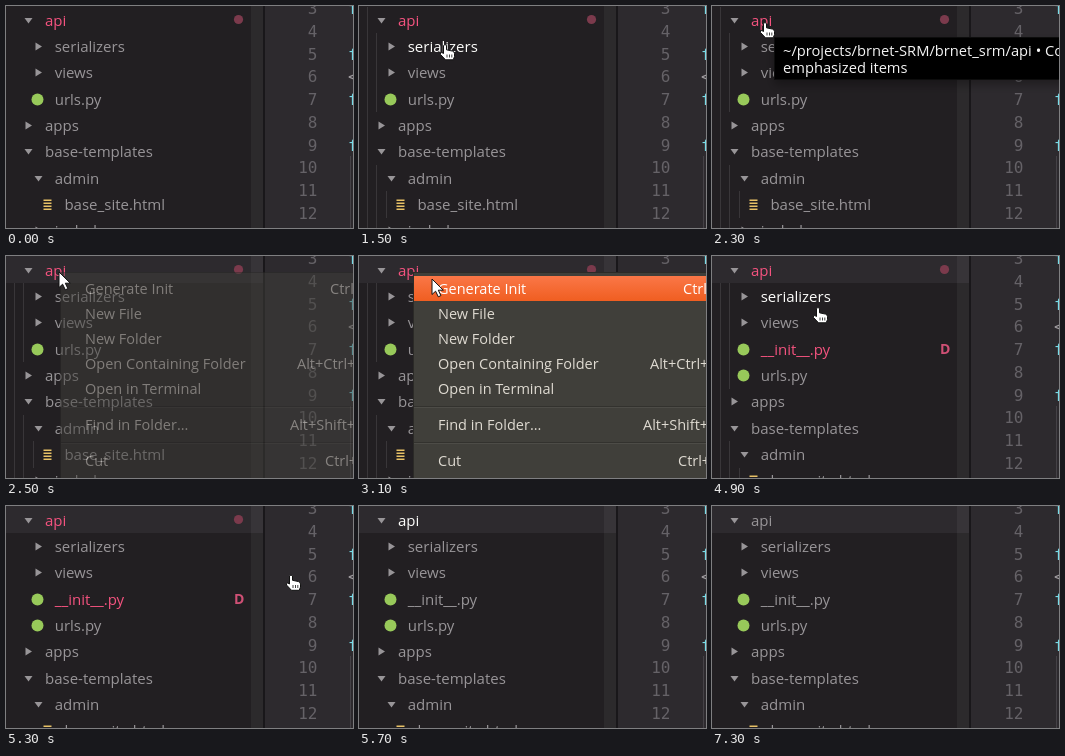
Animation of 347 by 222 pixels, one loop 7500 ms. Source, as an HTML page:

```html
<!DOCTYPE html>
<html lang="en">
<head>
<meta charset="utf-8">
<title>Generate Init</title>
<style>
html, body { margin: 0; height: 100%; overflow: hidden; background: #221f22; }
svg { display: block; width: 347px; height: 222px; }
text { font: 500 15px "Open Sans", "Noto Sans", sans-serif; white-space: pre; }
.line { font: 16px "DejaVu Sans Mono", monospace; text-anchor: end; }
.code { font: 16px "DejaVu Sans Mono", monospace; }
.status { font-weight: 700; font-size: 14px; }
.menu text { font-size: 14.5px; }
.tip text { font-size: 14.7px; }
</style>
</head>
<body>
<svg id="stage" viewBox="0 0 347 222">
  <defs>
    <linearGradient id="orange" x2="0" y2="1">
      <stop stop-color="#fa7747"/><stop offset="1" stop-color="#f05e21"/>
    </linearGradient>
    <filter id="shadow" x="-20%" y="-50%" width="140%" height="220%">
      <feDropShadow dx="0" dy="5" stdDeviation="5" flood-opacity=".3"/>
    </filter>
  </defs>
  <g id="scene"></g>
</svg>
<script>
const LOOP = 7500, STEP = 100, PITCH = 26.33;
const GREY = '#989598', PINK = '#f4537f', WHITE = '#fcfcfa';
const scene = document.getElementById('scene');

// time, x, y of the pointer's tip
const path = [
  [1000, 335, 190], [1200, 195, 108], [1500, 86, 38], [1600, 86, 38],
  [2000, 53, 16], [2800, 53, 16], [3100, 73, 23], [4600, 73, 23],
  [4900, 106, 51], [5200, 235, 87], [5400, 335, 50], [5600, 344, 5], [5700, 360, 0]
];

// name, depth, kind
const tree = [
  ['api', 0, 'open'], ['serializers', 1, 'shut'], ['views', 1, 'shut'],
  ['urls.py', 1, 'py'], ['apps', 0, 'shut'], ['base-templates', 0, 'open'],
  ['admin', 1, 'open'], ['base_site.html', 2, 'html'], ['includes', 1, 'shut']
];

// label, baseline, shortcut, its x
const items = [
  ['Generate Init', 38, 'Ctrl+', 324], ['New File', 63], ['New Folder', 88],
  ['Open Containing Folder', 113, 'Alt+Ctrl+', 291], ['Open in Terminal', 138],
  ['Find in Folder...', 174, 'Alt+Shift+', 284], ['Cut', 210, 'Ctrl+', 319]
];

const rect = (x, y, w, h, fill) =>
  `<rect x="${x}" y="${y}" width="${w}" height="${h}" fill="${fill}"/>`;
const text = (s, x, y, fill, cls = '') =>
  `<text class="${cls}" x="${x}" y="${y}" fill="${fill}">${s}</text>`;
const shape = (d, x, y, attrs) =>
  `<path d="${d}" transform="translate(${x} ${y})" ${attrs}/>`;

function pointer(t) {
  if (t < 1000 || t >= 5700) return null;
  const i = path.findIndex(p => p[0] > t);
  const [a, b] = [path[i - 1], path[i]], k = (t - a[0]) / (b[0] - a[0]);
  return [a[1] + (b[1] - a[1]) * k, a[2] + (b[2] - a[2]) * k];
}

function icon(kind, x, y) {
  const fill = `fill="${GREY}"`;
  if (kind === 'open') return shape('M-4-2.5h8L0 3z', x, y, fill);
  if (kind === 'shut') return shape('M-3-4v8l6.5-4z', x, y, fill);
  if (kind === 'py') return `<circle cx="${x - 1}" cy="${y}" r="6" fill="#98c95a"/>`;
  return [-5, -2, 1, 4].map(d => rect(x - 5, y + d, 8, 1.5, '#e8c266')).join('');
}

function sidebar(t, tip, menu) {
  const rows = [...tree];
  if (t >= 4400) rows.splice(3, 0, ['__init__.py', 1, 'py']);
  const edge = i => Math.round(1 + PITCH * i), n = rows.length;
  const guide = (x, a, b) => rect(x, edge(a), 1, edge(b) - edge(a), '#393639');
  const inside = tip && tip[0] < 257;
  let out = rect(0, 0, 257, 222, '#221f22');
  if (inside) out += guide(8, 0, n) + guide(17, 1, n - 5) + guide(17, n - 3, n) + guide(27, n - 2, n - 1);
  if (t >= 2500) out += rect(0, 0, 257, 27, '#2d2a2e');
  out += rect(245, 0, 12, 222, '#ffffff0c');

  const hover = inside && !menu ? Math.floor((tip[1] - 1) / PITCH) : -1;
  rows.forEach(([name, depth, kind], i) => {
    const y = Math.round(19.7 + PITCH * i);
    let fill = i === hover ? WHITE : GREY;
    if (name === 'api') fill = t < 5400 ? PINK : t < 7300 ? WHITE : GREY;
    if (name === '__init__.py' && t >= 4500 && t < 5500) {
      fill = PINK;
      out += text('D', 228, y - 1, '#cf5075', 'status');
    }
    out += icon(kind, 22.5 + 10 * depth, y - 5.5) + text(name, 39 + 9.7 * depth, y, fill);
  });
  if (t < 5400) out += '<circle cx="232.5" cy="13.5" r="4.6" fill="#7b3a4c"/>';
  return out;
}

function editor() {
  let out = rect(257, 0, 2, 222, '#19171a') + rect(259, 0, 88, 222, '#2d2a2e');
  for (let n = 3; n <= 12; n++) {
    const y = 8 + 22.75 * (n - 3);
    out += text(n, 311.5, y, '#656267', 'line');
    if ([3, 5, 7, 9].includes(n)) out += text('f', 342, y, '#78dce8', 'code');
    if (n === 6) out += text('&lt;', 342, y, '#a09da0', 'code');
  }
  return out + rect(344, 150, 1, 72, '#454247');
}

function tooltip() {
  return '<g class="tip"><rect x="62.5" y="31.5" width="300" height="42" fill="#020202" stroke="#0c0c0c" filter="url(#shadow)"/>' +
    text('~/projects/brnet-SRM/brnet_srm/api • Contains', 71, 50, '#f4f4f4') +
    text('emphasized items', 71, 67, '#f4f4f4') + '</g>';
}

function contextMenu(t) {
  const fading = t === 2500 || t === 3800;
  let out = `<g class="menu" opacity="${fading ? .5 : 1}">` +
    rect(54, 16, 293, 206, '#2b2a27') + rect(55, 17, 292, 205, '#403f3a');
  if (t >= 3000) out += rect(55, 20, 292, 25, 'url(#orange)');
  for (const y of [150, 186]) out += rect(55, y, 292, 1, '#33322e') + rect(55, y + 1, 292, 1, '#4d4c47');
  items.forEach(([label, y, keys, x], i) => {
    const fill = i === 0 && t >= 3000 ? '#fff' : '#dfdbd2';
    out += text(label, 79, y, fill);
    if (keys) out += text(keys, x, y, fill);
  });
  return out + '</g>';
}

function cursor([x, y], arrow) {
  const look = 'stroke-linejoin="round" fill="#fff" stroke="#111"';
  return arrow
    ? shape('M0 0v15.5l3.6-3.3 2.7 5.6 2.6-1.2-2.6-5.4h5z', x, y, look)
    : shape('M4 1.5q1.5-2 3 0v4.3l6 1.3q2 .6 2 2.5v3l-1.3 3.2H6L1 10.5q-.8-2 1.3-2l1.7 1z',
        x - 5.5, y, look) +
      shape('M7.5 10.5v3M10 10.5v3M12.3 10.5v3', x - 5.5, y, 'stroke="#111" stroke-width=".8"');
}

function draw(t) {
  const tip = pointer(t), menu = t >= 2500 && t < 3900;
  let out = sidebar(t, tip, menu) + editor();
  if (t >= 2300 && t < 2500) out += tooltip();
  if (menu) out += contextMenu(t);
  if (tip) out += cursor(tip, t >= 2500 && t < 4500);
  scene.innerHTML = out;
}

let last = -1;
function tick() {
  const t = Math.floor(performance.now() % LOOP / STEP) * STEP;
  if (t !== last) draw(last = t);
  requestAnimationFrame(tick);
}
tick();
</script>
</body>
</html>
```
